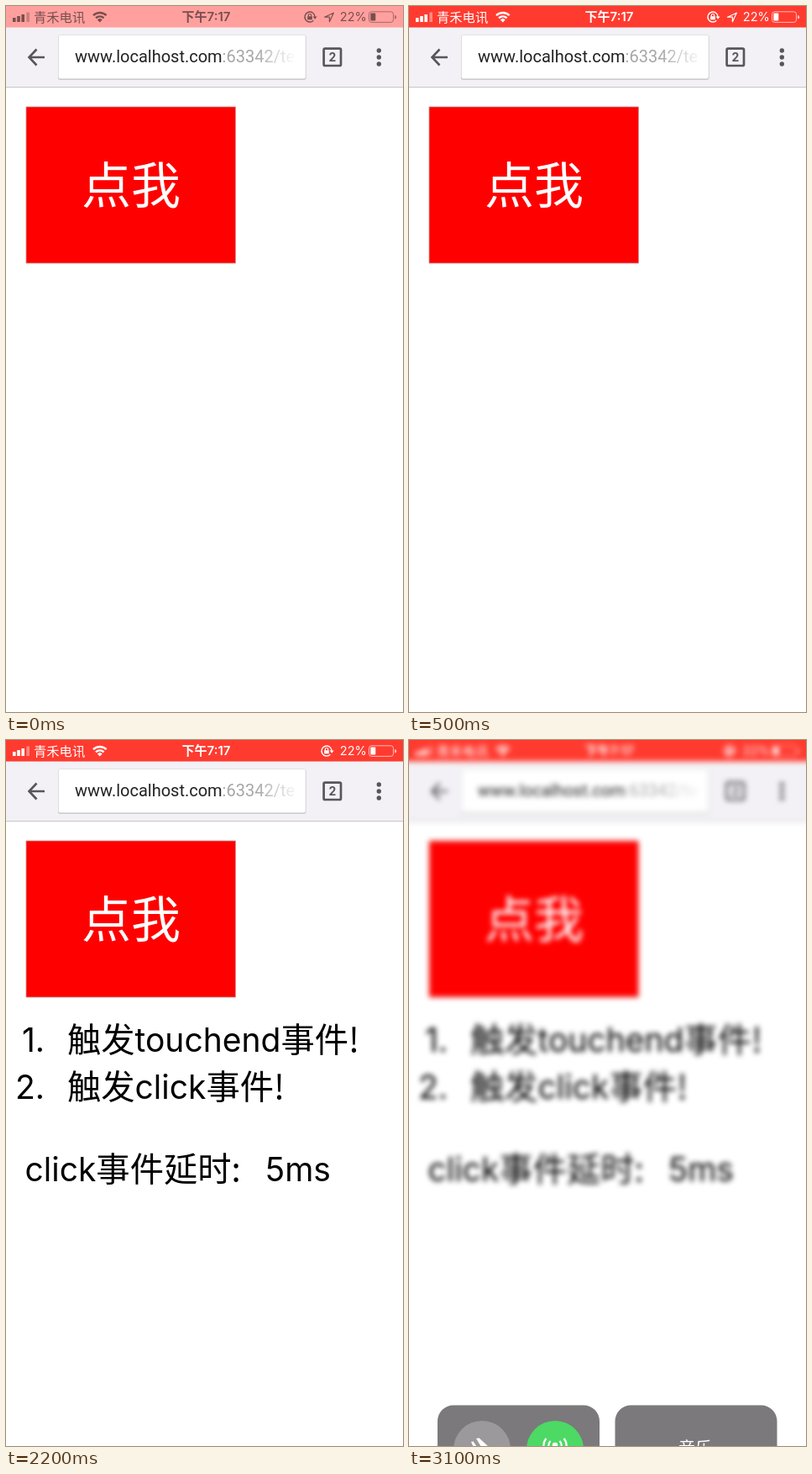
These frames come from a looping animation (473 by 840 pixels, 3200 ms). An HTML page:

```html
<!DOCTYPE html>
<html lang="zh-CN">
<head>
<meta charset="utf-8">
<style>
html, body { margin: 0; width: 100%; height: 100%; overflow: hidden; background: #fff; }
svg { display: block; width: 473px; height: 840px; }
text { font-family: Inter, "Noto Sans CJK SC", "Noto Sans CJK", sans-serif; white-space: pre; }
.zh { font-family: "Noto Sans CJK SC", "Noto Sans CJK", sans-serif; font-size: 40.3px; }
.log { font-size: 39px; }
.url { font: 20px Roboto, sans-serif; }
.status { font-size: 14.5px; }
.line { fill: none; stroke: currentColor; }
</style>
</head>
<body>
<svg viewBox="0 0 473 840">
  <defs>
    <linearGradient id="fade"><stop stop-color="#fff" stop-opacity="0"/><stop offset="1" stop-color="#fff"/></linearGradient>
    <filter id="blur" filterUnits="userSpaceOnUse" x="-40" y="-40" width="553" height="920" color-interpolation-filters="sRGB">
      <feGaussianBlur stdDeviation="3"/>
    </filter>
  </defs>

  <g id="page">
    <rect x="-40" y="-40" width="553" height="920" fill="#fff"/>
    <rect x="-40" y="25" width="553" height="71" fill="#f3f1f5"/>
    <rect x="-40" y="96" width="553" height="1.2" fill="#cbcacd"/>

    <g id="status" class="status" fill="currentColor">
      <rect id="bar" x="-40" y="-40" width="553" height="65.5"/>
      <path d="M8 14h3.6v5H8zM13.2 12h3.6v7h-3.6zM18.4 10h3.6v9h-3.6z"/>
      <path d="M24.4 7.5H28V19h-3.6z" opacity=".4"/>
      <text x="33" y="18.7" font-size="15.3">青禾电讯</text>
      <path class="line" stroke-width="2.4" d="M104 11.2a11 11 0 0 1 15.6 0M107 14.4a6.7 6.7 0 0 1 9.6 0"/>
      <path d="M111.8 19.4l-2.9-3a4.1 4.1 0 0 1 5.8 0z"/>
      <text x="238.5" y="18.4" font-size="15" font-weight="600" text-anchor="middle">下午7:17</text>
      <g id="lock">
        <path class="line" stroke-width="1.4" d="M4.3 4.2a6 6 0 1 1 1.7-4.2"/>
        <path d="M3.6 -.4h5l-2.5 3.2zM-2.8 -.7h5.6v3.9h-5.6z"/>
        <path class="line" stroke-width="1.2" d="M-1.7 -.5v-1.3a1.7 1.7 0 0 1 3.4 0v1.3"/>
      </g>
      <path id="arrow" class="line" stroke-width="1.2" stroke-linejoin="round" d="M379.5 13.2L390.3 8.2 385.4 18.8V13.2z"/>
      <text x="397.8" y="18.4">22%</text>
      <rect class="line" x="432.5" y="6.8" width="29" height="12.6" rx="3" stroke-width="1" opacity=".65"/>
      <rect x="434.3" y="8.6" width="6" height="9" rx="1"/>
      <path d="M463 11a2.2 2.2 0 0 1 0 4.4z" opacity=".65"/>
    </g>

    <rect x="62" y="35" width="295.5" height="52.8" rx="2" fill="#c2c1c4"/>
    <rect x="62.5" y="34.5" width="294.5" height="52" rx="2" fill="#fff" stroke="#dddce0" stroke-width=".8"/>
    <text class="url" x="82" y="67" fill="#222">www.localhost.com<tspan fill="#a6a6a6">:63342/te</tspan></text>
    <rect id="veil" x="298" y="44" height="34" fill="url(#fade)"/>

    <g color="#59565b" fill="currentColor">
      <path class="line" stroke-width="2.6" d="M46 61H28M36.5 51.5L27.5 61l9 9.5"/>
      <rect class="line" x="378.6" y="50.6" width="20.4" height="20.4" rx="1.5" stroke-width="2.7"/>
      <text x="388.8" y="66" font-size="14" font-weight="700" text-anchor="middle">2</text>
      <circle cx="444.3" cy="53" r="2.7"/><circle cx="444.3" cy="61" r="2.7"/><circle cx="444.3" cy="69" r="2.7"/>
    </g>

    <rect x="24" y="120" width="249.5" height="186" fill="red" stroke="#d09090" stroke-width=".8"/>
    <text class="zh" x="90" y="235" fill="#fff" style="font-size:59px">点我</text>

    <g id="log" class="log">
      <text x="46" y="371" text-anchor="end">1.</text>
      <text x="73" y="371"><tspan class="zh">触发</tspan>touchend<tspan class="zh">事件!</tspan></text>
      <text x="46" y="427" text-anchor="end">2.</text>
      <text x="73" y="427"><tspan class="zh">触发</tspan>click<tspan class="zh">事件!</tspan></text>
      <text x="22.5" y="524.5">click<tspan class="zh">事件延时:</tspan></text>
      <text id="delay" x="309" y="524.5"></text>
    </g>
  </g>

  <g id="panel" fill="#fff">
    <rect x="34" y="791.5" width="193" height="120" rx="19" fill="#7b797b"/>
    <rect x="245.5" y="791.5" width="193" height="120" rx="19" fill="#7b797b"/>
    <circle cx="87" cy="844" r="34" fill="#9b999c"/>
    <circle cx="174" cy="844" r="34" fill="#4cd964"/>
    <path d="M80 831l3.5-.5L95 841h-9zM74 835l2.5-.5 4 6h-4z"/>
    <circle cx="174" cy="839" r="3.2"/>
    <path fill="none" stroke="#fff" stroke-width="2.2" d="M168.5 845a8 8 0 0 1 0-11M179.5 845a8 8 0 0 0 0-11M163.5 848a13 13 0 0 1 0-17M184.5 848a13 13 0 0 0 0-17"/>
    <text class="zh" x="341" y="850" text-anchor="middle" style="font-size:20px;font-weight:500">音乐</text>
  </g>
</svg>
<script>
const $ = id => document.getElementById(id);
const show = (id, on) => $(id).style.display = on ? '' : 'none';
const mix = (a, b, k) => `rgb(${a.map((v, i) => Math.round(v + (b[i] - v) * k))})`;

function draw(t) {
  // The status bar brightens in three hard steps.
  const k = Math.min(Math.floor(t / 100), 3) / 3;
  const tapped = t >= 900, pulled = t >= 3100;
  $('bar').setAttribute('fill', mix([255, 160, 158], [255, 59, 48], k));
  $('status').style.color = mix([122, 78, 78], [255, 255, 255], k);
  $('veil').setAttribute('width', 47 + 5 * k);
  $('lock').setAttribute('transform', `translate(${tapped ? 382 : 362} 13)`);
  show('arrow', !tapped);
  show('log', tapped);
  $('delay').textContent = t < 2200 ? '21ms' : '5ms';
  show('panel', pulled);
  $('page').setAttribute('filter', pulled ? 'url(#blur)' : 'none');
}

const start = performance.now();
function tick() {
  draw((performance.now() - start) % 3200);
  requestAnimationFrame(tick);
}
tick();
</script>
</body>
</html>
```
